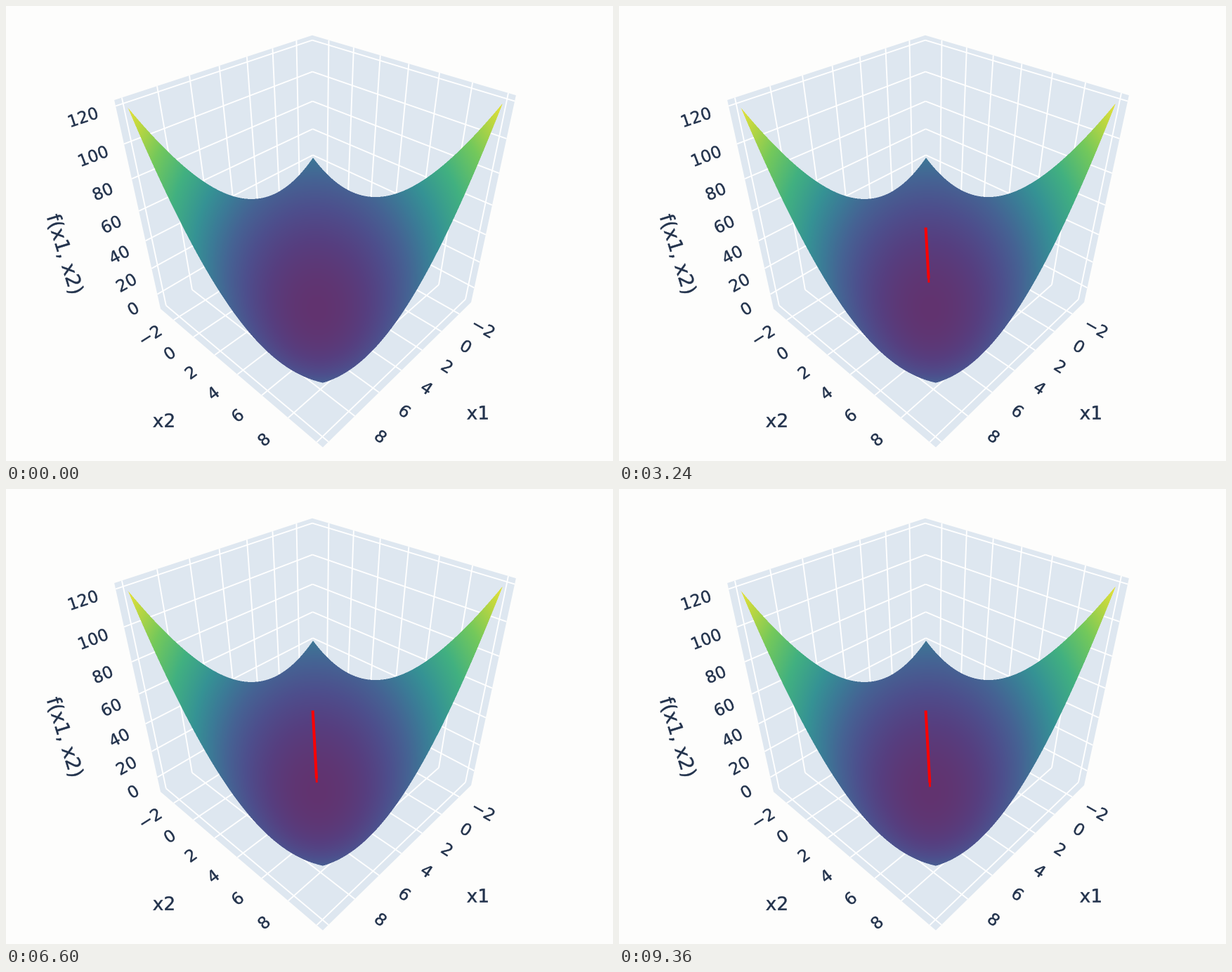
Recreate the animation shown at these times as a matplotlib script. Size 864x648 px, loop 9.38 s.

```python
import numpy as np
import matplotlib.pyplot as plt
from matplotlib.animation import FuncAnimation
from matplotlib.collections import LineCollection
from matplotlib.colors import LinearSegmentedColormap
from matplotlib.patches import PathPatch, Polygon
from matplotlib.path import Path
from matplotlib.textpath import TextPath
from matplotlib.transforms import Affine2D

W, H, DPI = 864, 648, 100
PX = 72 / DPI
INK = "#22324c"

# Perspective camera looking at the centre of the plot box
DIST, FOCAL = 2.26, 797
CX, CY = 442.5, 297.5
AZ, EL = np.radians([43.3, 35])
EYE = np.array([np.cos(EL) * np.cos(AZ), np.cos(EL) * np.sin(AZ), np.sin(EL)])
RIGHT = np.array([-np.sin(AZ), np.cos(AZ), 0])
UP = np.cross(EYE, RIGHT)

# Data ranges, padded by 1/32 on each side
LO, HI = -3, 10
F_MIN, F_MAX = -8, 119
MID = (LO + HI) / 2
SPAN = (HI - LO) * 17 / 16
F_SPAN = (F_MAX - F_MIN) * 17 / 16
F_MID = (F_MIN + F_MAX) / 2
HALF, HALF_Z = 0.5, 0.504
LABEL_GAP = 0.122


def f(x, y):
    return x * x - x * y + y * y - 4 * x - 4 * y + 8


def box_x(v):
    return (v - MID) / SPAN


def box_z(v):
    return (v - F_MID) / F_SPAN * 2 * HALF_Z


def project(*p):
    p = np.array(p, float)
    depth = DIST - p @ EYE
    return np.array([CX + FOCAL * (p @ RIGHT) / depth,
                     CY - FOCAL * (p @ UP) / depth])


def surface_image(x0, x1, y0, y1, ss=2):
    """Cast a ray through every subpixel and intersect it with the quadric."""
    px = x0 + (np.arange((x1 - x0) * ss) + 0.5) / ss
    py = y0 + (np.arange((y1 - y0) * ss) + 0.5) / ss
    px, py = np.meshgrid(px, py)
    ray = (-EYE + (px - CX)[..., None] / FOCAL * RIGHT
           + (CY - py)[..., None] / FOCAL * UP)
    scale = np.array([SPAN, SPAN, F_SPAN / (2 * HALF_Z)])
    ox, oy, oz = DIST * EYE * scale + np.array([MID, MID, F_MID])
    dx, dy, dz = np.moveaxis(ray * scale, -1, 0)

    a = dx * dx - dx * dy + dy * dy
    b = 2 * ox * dx - ox * dy - oy * dx + 2 * oy * dy - 4 * dx - 4 * dy - dz
    c = f(ox, oy) - oz
    disc = b * b - 4 * a * c
    root = np.sqrt(np.maximum(disc, 0))

    height = np.zeros_like(a)
    hit = np.zeros(a.shape, bool)
    for sign in (-1, 1):
        t = (-b + sign * root) / (2 * a)
        x, y = ox + t * dx, oy + t * dy
        inside = ((disc >= 0) & (t > 0) & (x >= LO) & (x <= HI)
                  & (y >= LO) & (y <= HI) & ~hit)
        height[inside] = f(x, y)[inside]
        hit |= inside

    rgb = cmap((height - F_MIN) / (F_MAX - F_MIN))[..., :3] * hit[..., None]

    def shrink(m):
        h, w = m.shape[:2]
        return m.reshape(h // ss, ss, w // ss, ss, -1).mean(axis=(1, 3))

    alpha = shrink(hit.astype(float))
    rgb = shrink(rgb) / np.maximum(alpha, 1e-9)
    return np.uint8(np.round(np.dstack([rgb, alpha]).clip(0, 1) * 255))


def text_path(s, pos, size, angle=0):
    path = TextPath((0, 0), s, size=size)
    box = path.get_extents()
    move = (Affine2D()
            .translate(-(box.x0 + box.x1) / 2, -(box.y0 + box.y1) / 2)
            .scale(1, -1).rotate(angle).translate(*pos))
    return move.transform_path(path)


def tick_label(v, outer, inner):
    """Label at the outer point, turned along its grid line."""
    p, q = project(*outer), project(*inner)
    d = q - p if q[0] > p[0] else p - q
    return text_path(str(v).replace("-", "\u2212"), p, 23.5,
                     np.arctan2(d[1], d[0]))


stops = [(0, (97, 51, 111)), (.1, (86, 62, 127)), (.2, (77, 78, 140)),
         (.3, (69, 98, 147)), (.4, (59, 122, 150)), (.5, (53, 146, 148)),
         (.65, (65, 176, 128)), (.8, (115, 200, 91)), (.92, (186, 214, 64)),
         (1, (230, 225, 58))]
cmap = LinearSegmentedColormap.from_list(
    "bowl", [(p, np.array(c) / 255) for p, c in stops], N=512)

fig = plt.figure(figsize=(W / DPI, H / DPI), dpi=DPI, facecolor="#fdfdfc")
ax = fig.add_axes([0, 0, 1, 1])

# Box walls and floor
A, Z = HALF, HALF_Z
outline = [(-A, -A, Z), (A, -A, Z), (A, -A, -Z), (A, A, -Z),
           (-A, A, -Z), (-A, A, Z)]
ax.add_patch(Polygon([project(*p) for p in outline], fc="#dee7f0", ec="none",
                     zorder=1))

x_ticks = range(-2, 11, 2)
z_ticks = range(0, 121, 20)
grid = []
for v in x_ticks:
    g = box_x(v)
    grid += [((g, -A, Z), (g, -A, -Z)), ((g, -A, -Z), (g, A, -Z)),
             ((-A, g, Z), (-A, g, -Z)), ((-A, g, -Z), (A, g, -Z))]
for v in z_ticks:
    g = box_z(v)
    grid += [((A, -A, g), (-A, -A, g)), ((-A, -A, g), (-A, A, g))]
ax.add_collection(LineCollection(
    [[project(*p), project(*q)] for p, q in grid],
    colors="white", linewidths=1.9 * PX, zorder=2))

# Tick labels and axis titles
out = A + LABEL_GAP
texts = []
for v in x_ticks[:-1]:
    g = box_x(v)
    texts += [tick_label(v, (g, out, -Z), (g, A, -Z)),
              tick_label(v, (out, g, -Z), (A, g, -Z))]
for v in z_ticks:
    g = box_z(v)
    texts.append(tick_label(v, (out, -A, g), (A, -A, g)))
texts += [text_path("x1", (671, 579), 26.5),
          text_path("x2", (224, 590), 26.5),
          text_path("f(x1, x2)", (83, 353), 28, np.radians(73))]
ax.add_patch(PathPatch(Path.make_compound_path(*texts), fc=INK, ec=INK,
                       lw=0.4 * PX, zorder=3))

x0, x1, y0, y1 = 166, 716, 132, 546
ax.imshow(surface_image(x0, x1, y0, y1), extent=(x0, x1, y1, y0),
          interpolation="nearest", aspect="auto", zorder=4)

trail, = ax.plot([], [], color="red", lw=4 * PX, zorder=5,
                 solid_capstyle="butt")
tip, = ax.plot([], [], color="red", lw=2.8 * PX, zorder=5,
               solid_capstyle="butt")

ax.set_xlim(0, W)
ax.set_ylim(H, 0)
ax.axis("off")

START, GOAL = np.array([436.6, 315.5]), np.array([442.9, 428])
DECAY = 0.9831


def update(i):
    # Three descent steps per 140 ms, held for 20, 100 and 20 ms
    cycle, phase = divmod(i, 7)
    n = 3 * cycle + (phase >= 1) + (phase >= 6)
    end = GOAL + (START - GOAL) * DECAY ** n
    neck = START + (end - START) * max(0, 1 - 6 / max(end[1] - START[1], 6))
    trail.set_data(*np.transpose([START, neck]))
    tip.set_data(*np.transpose([neck, end]))
    return trail, tip


anim = FuncAnimation(fig, update, frames=469, interval=20, repeat=True,
                     repeat_delay=0, blit=False)
plt.show()
```
